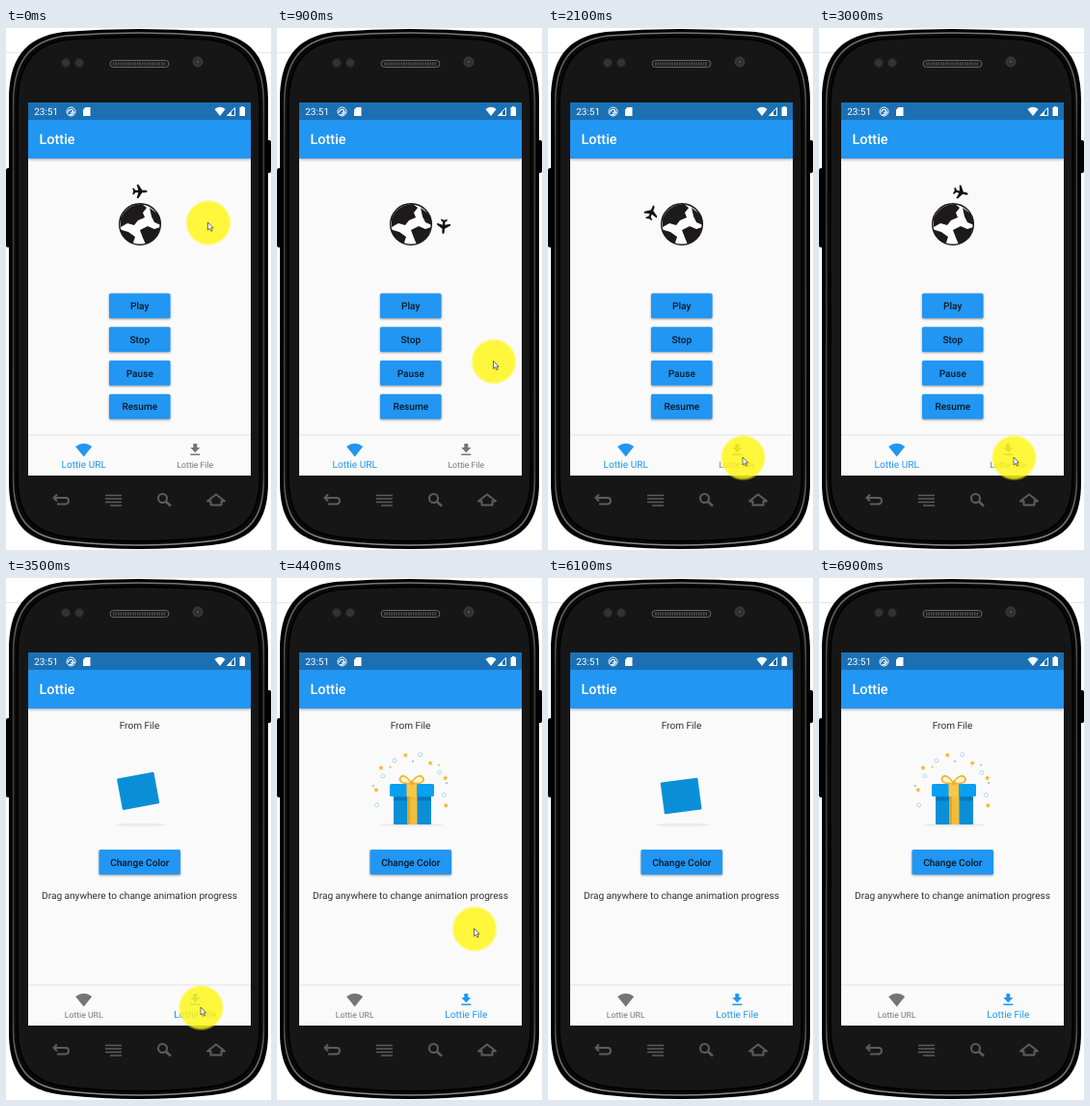
An HTML page for the animation above (7000 ms loop, 275 by 540 pixels).

```html
<!DOCTYPE html>
<html lang="en">
<head>
<meta charset="utf-8">
<title>Lottie</title>
<style>
  html, body { margin: 0; width: 100%; height: 100%; overflow: hidden; background: #fff; }
  svg { display: block; width: 275px; height: 540px; }
  text { font-family: Roboto, sans-serif; font-size: 10.1px; text-rendering: geometricPrecision; }
  .mid { text-anchor: middle; }
  .btn { fill: #2196f3; filter: drop-shadow(0 1.4px 1px rgba(0, 0, 0, .38)); }
  .label { font-weight: 500; fill: #0a1826; text-anchor: middle; }
  .keys { fill: none; stroke: #5c5c5c; stroke-width: 2; stroke-linejoin: round; }
</style>
</head>
<body>
<svg viewBox="0 0 275 540">
  <defs>
    <linearGradient id="rim" x2="0" y2="1">
      <stop offset="0" stop-color="#777"/>
      <stop offset=".2" stop-color="#3c3c3c"/>
      <stop offset=".85" stop-color="#444"/>
      <stop offset="1" stop-color="#8a8a8a"/>
    </linearGradient>
    <radialGradient id="glow">
      <stop offset=".88" stop-color="#fff614" stop-opacity=".83"/>
      <stop offset="1" stop-color="#fff614" stop-opacity="0"/>
    </radialGradient>
    <path id="shell" d="M3 75C3 34 18 9 60 4Q138-2 215 4C257 9 272 34 272 75V470C272 512 255 531 213 535Q138 543 62 535C20 531 3 512 3 470Z"/>
    <clipPath id="globeClip"><circle r="21.500"/></clipPath>
    <clipPath id="screen"><rect x="23" y="77" width="231" height="386"/></clipPath>
  </defs>

  <!-- phone -->
  <path d="M0 25.500H275" stroke="#e6e6e6"/>
  <rect y="145" width="6" height="82" rx="2"/>
  <rect x="269" y="116" width="6" height="34" rx="2"/>
  <use href="#shell"/>
  <use href="#shell" fill="#0a0a0a" stroke="url(#rim)" stroke-width="1.600" transform="translate(4.700 4) scale(.966 .985)"/>
  <use href="#shell" fill="#161616" stroke="#000" stroke-width="2" transform="translate(9 8) scale(.935 .970)"/>
  <rect x="108" y="33.500" width="61" height="7" rx="3.500" fill="#1a1a1a" stroke="#666"/>
  <path d="M111 37H166" stroke="#4b4b4b" stroke-width="3.500" stroke-dasharray="1.500 1"/>
  <g fill="#333" stroke="#222">
    <circle cx="62" cy="36" r="4.500"/><circle cx="76" cy="36" r="4.500"/>
    <circle cx="199" cy="35" r="5" stroke="#3c3c3c"/><circle cx="199" cy="35" r="2" fill="#555"/>
  </g>
  <g class="keys">
    <path d="M50 486H62Q65 486 65 489T62 492.500H53M53 482.500L49.500 486L53 489.500"/>
    <path d="M103 483.500H120M103 487H120M103 490.500H120M108 494H120" stroke-width="1.600"/>
    <circle cx="162.500" cy="486.500" r="4.500"/><path d="M166 490L171 494.500" stroke-width="2.500"/>
    <path d="M209 489.500L218 482.500L227 489.500H223.500V493.500H212.500V489.500Z"/>
  </g>

  <!-- app frame -->
  <g clip-path="url(#screen)">
    <rect x="23" y="77" width="231" height="386" fill="#fafafa"/>
    <rect x="23" y="95" width="231" height="40" fill="#2196f3" style="filter:drop-shadow(0 1px 1.500px rgba(0,0,0,.35))"/>
    <rect x="23" y="77" width="231" height="18" fill="#1b70b4"/>
    <path d="M23 421H254" stroke="#e2e2e2"/>
  </g>
  <g fill="#fff">
    <text x="29.200" y="90" style="font-size:10px">23:51</text>
    <g fill="none" stroke="#fff">
      <circle cx="67.500" cy="86.500" r="4.500"/>
      <path d="M64.500 87.500Q65 83.500 69 84.500Q70.500 87 67 87.500M65.500 89.500Q69.500 90 70.500 86.500" stroke-width="1.200"/>
    </g>
    <path d="M82.500 82H87.500V91H80V84.500Z"/>
    <path d="M216.500 84Q222 79.500 227.500 84L222 91Z"/>
    <path d="M229.500 90.500H237.500V82.500Z" fill="none" stroke="#fff"/><path d="M229 91L234 86V91Z"/>
    <path d="M242.500 82H244V81H246.500V82H248V91H242.500Z"/>
    <text x="34.500" y="120" style="font-size:14.440px;font-weight:500">Lottie</text>
  </g>

  <!-- URL page -->
  <g id="urlPage">
    <g transform="translate(139 203)">
      <circle r="21.500" fill="#fff"/>
      <g clip-path="url(#globeClip)" fill="#1c1a1b">
        <path d="M-20-6Q-14-20 2-21L7-17L3-12L5-7L-2-4L-6 1L-13-1L-20 3Z"/>
        <path d="M10-17L22-8V1L15-2L12-8Z"/>
        <path d="M0 6L8 2L15 5L21 3L17 14L6 21L3 14Z"/>
        <path d="M-22 5L-12 8L-5 13L-8 22H-18Z"/>
      </g>
      <circle r="21.300" fill="none" stroke="#1c1a1b" stroke-width="1.500"/>
      <path id="plane" d="M8-34L6-35.200H2.300L-1.500-41H-3.300L-1.700-35.200H-4.800L-6.300-37.300H-7.800L-6.800-34L-7.800-30.700H-6.300L-4.800-32.800H-1.700L-3.300-27H-1.500L2.300-32.800H6Z" fill="#111"/>
    </g>
  </g>

  <!-- File page -->
  <g id="filePage">
    <g fill="#303030" class="mid">
      <text x="138.500" y="155.500">From File</text>
      <text x="138.500" y="332">Drag anywhere to change animation progress</text>
    </g>
    <ellipse id="shade" cx="140" cy="255.500" ry="1.800" fill="#ebebeb"/>
    <g id="confetti"></g>
    <g id="box">
      <rect x="-19.500" y="-16.500" width="39" height="33" rx="1" fill="#0a8fd6"/>
      <g id="ribbon">
        <rect x="-19.500" y="-12" width="39" height="4" fill="#0878b8"/>
        <rect x="-5.500" y="-16.500" width="10.500" height="33" fill="#f3bd3c"/>
        <rect x="-5.500" y="-16.500" width="3" height="33" fill="#dca52c"/>
      </g>
    </g>
    <g id="lid">
      <rect x="-23" y="-6.500" width="46" height="13" rx="1.500" fill="#0a9ff0"/>
      <g id="bow">
        <rect x="-5.500" y="-6.500" width="10.500" height="13" fill="#f8c748"/>
        <path d="M0-7Q-13-6-12.500-12Q-9-19-1-8Q8-19 12-12Q13-6 0-7Z" fill="#fdf3d4" stroke="#f0b731" stroke-width="1.800"/>
        <circle cy="-7.500" r="2.200" fill="#eeb02a"/>
      </g>
    </g>
  </g>

  <g id="tabs"></g>

  <g id="pointer">
    <circle r="24" fill="url(#glow)"/>
    <path d="M0 0V8L1.900 6.300L3.200 9.200L4.600 8.600L3.300 5.800H5.600Z" transform="translate(-.500 -.500)" fill="#fff" stroke="#333" stroke-width=".700"/>
  </g>
</svg>
<script>
const CYCLE = 7000, SWITCH = 3100, LAP = 2820, GIFT_START = 3450, GIFT_TIME = 1250;

const $ = id => document.getElementById(id);
const mix = (a, b, p) => a + (b - a) * p;
const linear = (t, from, to) => Math.min(1, Math.max(0, (t - from) / (to - from)));
const ramp = (t, from, to) => {
  const p = linear(t, from, to);
  return p * p * (3 - 2 * p);
};

function set(el, attrs) {
  for (const k in attrs) el.setAttribute(k, attrs[k]);
  return el;
}

function add(parent, tag, attrs, text = '') {
  const el = set(document.createElementNS('http://www.w3.org/2000/svg', tag), attrs);
  el.textContent = text;
  return parent.appendChild(el);
}

function button(page, label, x, y, width) {
  add(page, 'rect', { class: 'btn', x, y, width, height: 25.7, rx: 1.5 });
  add(page, 'text', { class: 'label', x: x + width / 2, y: y + 16.5 }, label);
}
['Play', 'Stop', 'Pause', 'Resume'].forEach((s, i) => button($('urlPage'), s, 107, 274.6 + i * 34.7, 63.5));
button($('filePage'), 'Change Color', 96.5, 281, 84.5);

// Returns a setter for how far the tab is selected, 0 to 1.
function tab(x, label, icon) {
  const g = add($('tabs'), 'g', { transform: `translate(${x} 0)` });
  add(g, 'path', { d: icon });
  const text = add(g, 'text', { class: 'mid', y: 455 }, label);
  return on => {
    const rgb = [33, 150, 243].map(c => Math.round(mix(117, c, on)));
    set(g, { fill: `rgb(${rgb})` });
    text.style.fontSize = mix(8.66, 10.1, on) + 'px';
  };
}
const urlTab = tab(80.7, 'Lottie URL', 'M-8.500 433Q0 426.500 8.500 433L0 443.500Z');
const fileTab = tab(196.3, 'Lottie File', 'M-2 430H2V434H5L0 439.300L-5 434H-2ZM-5 440.500H5V442H-5Z');

let seed = 11;
const random = () => (seed = seed * 16807 % 2147483647) / 2147483647;

function star(r) {
  const points = Array.from({ length: 10 }, (_, i) => {
    const a = i * Math.PI / 5, d = i % 2 ? r * .45 : r;
    return [d * Math.sin(a), -d * Math.cos(a)];
  });
  return `M${points.join('L')}Z`;
}

// Confetti fans out over the gift: stars, rings and dots in turn.
const confetti = Array.from({ length: 17 }, (_, i) => {
  const angle = Math.PI * mix(-.12, 1.12, (i + random()) / 17), reach = mix(.75, 1, random());
  const el = [
    () => add($('confetti'), 'path', { d: star(2.9), fill: '#f5b427' }),
    () => add($('confetti'), 'circle', { r: 2, fill: 'none', stroke: '#b4d8e8' }),
    () => add($('confetti'), 'circle', { r: 1.1, fill: i % 2 ? '#eebd5d' : '#9fbccb' })
  ][i % 3]();
  return { el, dx: 44 * reach * Math.cos(angle), dy: -42 * reach * Math.sin(angle) };
});

// The gift drops, opens with a burst and closes; then it all runs backwards.
function drawGift(t) {
  const g = Math.max(0, t - GIFT_START) % (2 * GIFT_TIME);
  const u = GIFT_TIME - Math.abs(g - GIFT_TIME);
  const drop = ramp(u, 0, 400), bow = ramp(u, 560, 780);
  const lift = ramp(u, 380, 550) - ramp(u, 550, 750);
  const burst = 1 - (1 - linear(u, 400, 750)) ** 3;

  set($('box'), { transform: `translate(${mix(137, 140.5, drop)} ${mix(219.5, 238.5, drop)}) rotate(${mix(-11, 0, drop)})` });
  set($('shade'), { rx: mix(26, 32, drop) });
  set($('ribbon'), { opacity: ramp(u, 380, 480) });
  set($('lid'), {
    opacity: ramp(u, 380, 450),
    transform: `translate(${140 - lift} ${219.5 - 7.5 * lift}) rotate(${-8 * lift})`
  });
  set($('bow'), { opacity: bow, transform: `scale(1 ${bow})` });
  for (const { el, dx, dy } of confetti) {
    set(el, { opacity: burst, transform: `translate(${140 + dx * burst} ${222 + dy * burst}) scale(${burst})` });
  }
}

function drawPlane(t) {
  const p = t % LAP / LAP;
  const eased = p - .4 * Math.sin(2 * Math.PI * p) / (2 * Math.PI);
  set($('plane'), { transform: `rotate(${360 * eased})` });
}

// Pointer moves: start, end, x, y
const moves = [
  [200, 850, 225, 345], [1000, 1400, 236, 442], [1400, 1800, 202.5, 444.5],
  [3900, 4400, 205, 363], [4800, 5300, 205, 575]
];
function drawPointer(t) {
  let x = 210, y = 201.5;
  for (const [from, to, endX, endY] of moves) {
    const p = ramp(t, from, to);
    x = mix(x, endX, p);
    y = mix(y, endY, p);
  }
  set($('pointer'), { transform: `translate(${x} ${y})` });
}

function draw(t) {
  const onFile = t >= SWITCH;
  $('urlPage').style.display = onFile ? 'none' : '';
  $('filePage').style.display = onFile ? '' : 'none';
  (onFile ? drawGift : drawPlane)(t);
  const selected = ramp(t, SWITCH + 50, SWITCH + 300);
  urlTab(1 - selected);
  fileTab(selected);
  drawPointer(t);
}

const start = performance.now();
function loop() {
  const t = (performance.now() - start) % CYCLE;
  draw(Math.floor(t / 100) * 100);
  requestAnimationFrame(loop);
}
loop();
</script>
</body>
</html>
```
